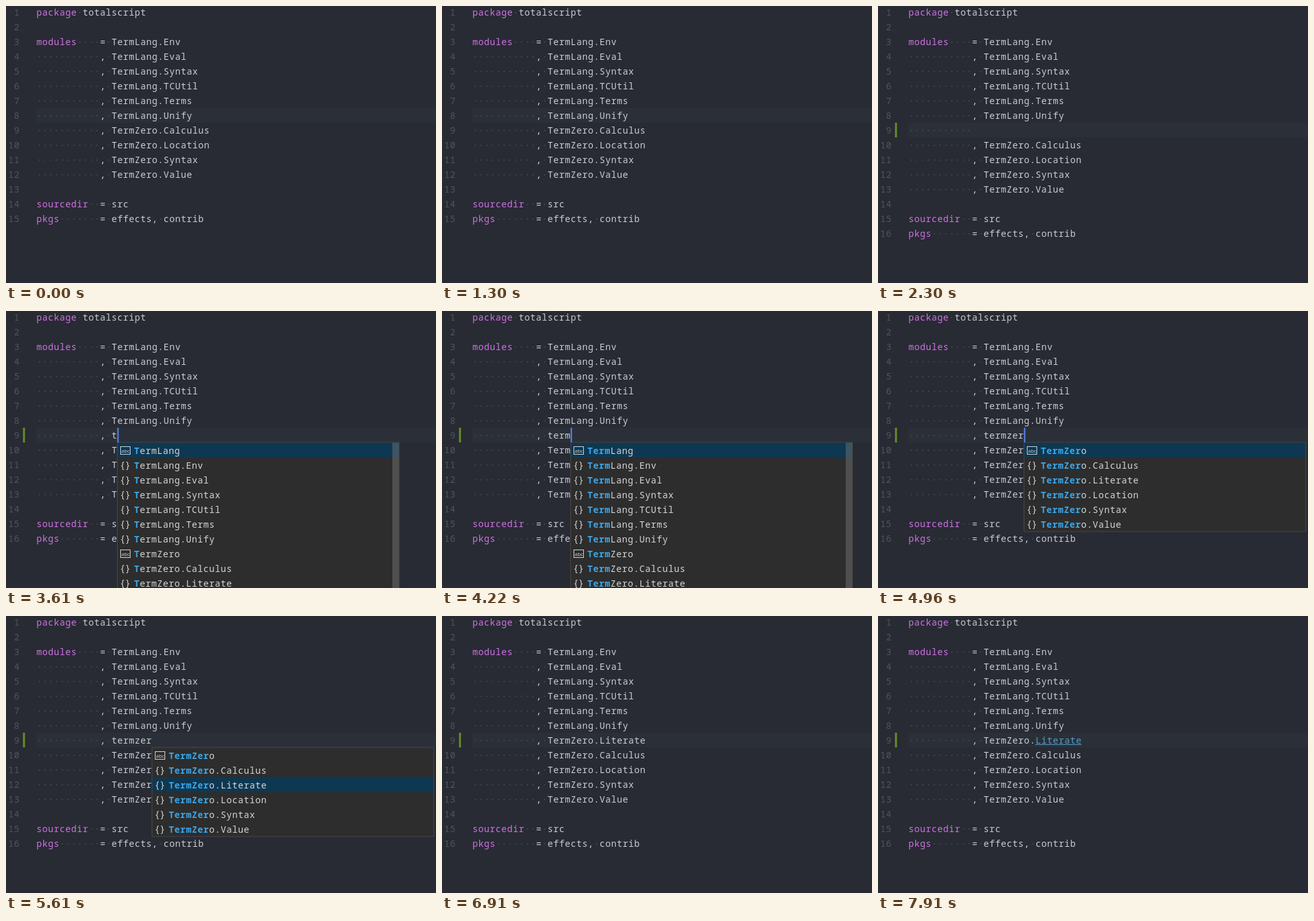
Animation of 670x432 px, one loop 8000 ms. Source, as an HTML page with a canvas:

```html
<!DOCTYPE html>
<html lang="en">
<head>
<meta charset="utf-8">
<title>Editor completion</title>
<style>
  html, body { margin: 0; width: 100%; height: 100%; overflow: hidden; background: #282b33; }
  canvas { display: block; }
</style>
</head>
<body>
<canvas id="stage" width="670" height="432"></canvas>
<script>
const ctx = document.getElementById('stage').getContext('2d');
const LOOP = 8000, LINE = 23, CELL = 9, LEFT = 47, BLINK = 500, FADE = 170;
const FONT = '14px "Noto Sans Mono", monospace';
const COLOR = {
  back: '#282b33', text: '#cacdd5', keyword: '#d071e6', number: '#50545d',
  dot: '#4a4f59', active: '#2b3038', added: '#648f2b', cursor: '#5889ee', link: '#519fcb',
  popup: '#2d2d2d', border: '#484848', chosen: '#0e3852', match: '#3ba7ea', item: '#d6d6d6',
  slider: 'rgba(121, 121, 121, 0.45)'
};

const indent = ' '.repeat(11);
const zeroModules = ['Calculus', 'Location', 'Syntax', 'Value'].map(m => 'TermZero.' + m);
const langModules = ['Env', 'Eval', 'Syntax', 'TCUtil', 'Terms', 'Unify'].map(m => 'TermLang.' + m);
const before = [
  'package totalscript', '',
  'modules    = ' + langModules[0],
  ...langModules.slice(1).map(m => indent + ', ' + m)
];
const after = [
  ...zeroModules.map(m => indent + ', ' + m), '',
  'sourcedir  = src',
  'pkgs       = effects, contrib'
];
const words = ['TermLang', ...langModules, 'TermZero', ...zeroModules,
  'TermZero.Literate', 'totalscript'].sort();

// Time of each edit and the text then standing on the new line.
const edits = [
  [1310, ''], [2920, ','], [3140, ', '],
  [3440, ', t'], [3620, ', te'], [3810, ', ter'], [4010, ', term'],
  [4340, ', termz'], [4590, ', termze'], [4850, ', termzer'],
  [6230, ', TermZero.Literate']
];
const MARK_AT = 1800, DOWN_AT = [5220, 5460], LINK_AT = 7500;

function box(x, y, w, h, color) {
  ctx.fillStyle = color;
  ctx.fillRect(x, y, w, h);
}

// Letter spacing follows each glyph, so the text moves right to sit in its cells.
function write(text, x, y, color, weight = '') {
  ctx.font = weight + ' ' + FONT;
  ctx.letterSpacing = '0.6px';
  ctx.fillStyle = color;
  ctx.fillText(text, x + 0.6, y);
}

const lineTop = row => row * LINE - 2;

function drawLine(text, row) {
  const base = lineTop(row) + 17;
  const label = String(row + 1);
  write(label, 21 - label.length * CELL, base, COLOR.number);
  const keyword = text.match(/^\w*/)[0];
  write(keyword, LEFT, base, COLOR.keyword);
  write(text.slice(keyword.length), LEFT + keyword.length * CELL, base, COLOR.text);
  [...text].forEach((c, i) => {
    if (c === ' ') box(LEFT + i * CELL + 4, base - 5.5, 1.6, 1.6, COLOR.dot);
  });
}

function drawIcon(isModule, x, y) {
  ctx.letterSpacing = '0px';
  ctx.fillStyle = ctx.strokeStyle = COLOR.item;
  ctx.lineWidth = 1;
  if (isModule) {
    ctx.font = FONT;
    ctx.fillText('{', x + 4.5, y + 16.3);
    ctx.fillText('}', x + 12.5, y + 16.3);
  } else {
    ctx.strokeRect(x + 5.5, y + 6, 15, 12);
    ctx.font = '8px "Open Sans", sans-serif';
    ctx.fillText('abc', x + 6.7, y + 15);
  }
}

function drawPopup(typed, x, y, chosen) {
  const found = words.filter(w => w.toLowerCase().startsWith(typed));
  const shown = found.slice(0, 12);
  const height = shown.length * LINE;
  box(x, y - 1, 440, height + 2, COLOR.border);
  box(x + 1, y, 438, height, COLOR.popup);
  shown.forEach((word, i) => {
    const top = y + i * LINE, n = typed.length;
    if (i === chosen) box(x + 1, top, 438, LINE, COLOR.chosen);
    drawIcon(word.includes('.'), x, top);
    write(word.slice(0, n), x + 26, top + 17.5, COLOR.match, 'bold');
    write(word.slice(n), x + 26 + n * CELL, top + 17.5, COLOR.item);
  });
  if (found.length > shown.length)
    box(x + 429, y, 10, height * shown.length / found.length, COLOR.slider);
}

function drawCursor(x, y, age) {
  const phase = age % (2 * BLINK);
  ctx.globalAlpha = phase < BLINK ? 1 : Math.max(0, 1 - (phase - BLINK) / FADE);
  box(x + 0.5, y, 2, LINE, COLOR.cursor);
  ctx.globalAlpha = 1;
}

function draw(t) {
  const edit = edits.filter(([at]) => at <= t).pop();
  const row = edit ? 8 : 7, top = lineTop(row);
  box(0, 0, 670, 432, COLOR.back);
  box(LEFT, top, 670 - LEFT, LINE, COLOR.active);
  const lines = edit ? [...before, indent + edit[1], ...after] : [...before, ...after];
  lines.forEach(drawLine);

  if (edit) {
    const [at, text] = edit;
    const end = LEFT + (indent.length + text.length) * CELL;
    if (t >= MARK_AT) box(26.5, top, 3, LINE, COLOR.added);
    if (t >= LINK_AT) {
      const x = end - 8 * CELL;
      box(x, top + 1, 8 * CELL, LINE - 2, COLOR.active);
      write('Literate', x, top + 17, COLOR.link);
      box(x, top + 18, 8 * CELL, 1, COLOR.link);
    }
    const typed = text.slice(2);
    if (/^[a-z]+$/.test(typed))
      drawPopup(typed, end, top + LINE + 0.5, DOWN_AT.filter(d => d <= t).length);
    drawCursor(end, top, t - at);
  }
}

function tick() {
  draw(performance.now() % LOOP);
  requestAnimationFrame(tick);
}
tick();
</script>
</body>
</html>
```
